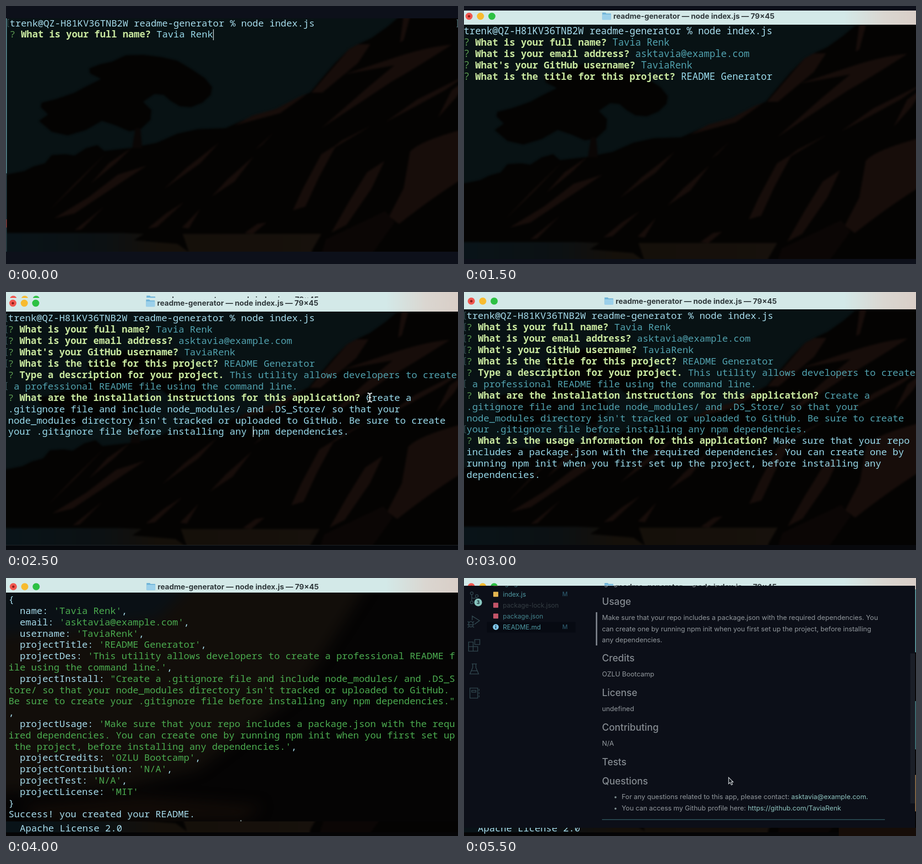
These frames come from a looping animation (989 px wide and 566 px high, 6000 ms). An HTML page:

```html
<!DOCTYPE html>
<html lang="en">
<head>
<meta charset="utf-8">
<title>readme-generator</title>
<style>
html, body { margin: 0; width: 100%; height: 100%; overflow: hidden; background: #0d101a; }
svg { display: block; width: 989px; height: 566px; }
text { white-space: pre; font-family: Inter, sans-serif; }
.mono { font-family: "Noto Sans Mono", "DejaVu Sans Mono", monospace; font-weight: 500; }
.badge { font-family: "DejaVu Sans", sans-serif; }
.scene { display: none; }
.line { fill: none; stroke-width: 1.6; }
</style>
</head>
<body>
<svg id="stage" viewBox="0 0 989 566">
  <defs>
    <linearGradient id="pale">
      <stop offset=".84" stop-color="#d3e9e8"/><stop offset=".93" stop-color="#dad6d0"/><stop offset="1" stop-color="#d9cec7"/>
    </linearGradient>
    <linearGradient id="water">
      <stop offset="0" stop-color="#091419"/><stop offset=".33" stop-color="#0c1113"/><stop offset=".5" stop-color="#15100a"/><stop offset="1" stop-color="#17110c"/>
    </linearGradient>
    <filter id="soft" color-interpolation-filters="sRGB"><feGaussianBlur stdDeviation="2"/></filter>
    <filter id="haze" color-interpolation-filters="sRGB"><feGaussianBlur stdDeviation="14"/></filter>
    <clipPath id="view"><rect y="17" width="989" height="531"/></clipPath>
    <clipPath id="page"><rect x="250" y="84" width="730" height="640"/></clipPath>
    <clipPath id="high"><rect width="989" height="13"/></clipPath>
    <clipPath id="pane"><rect y="32" width="989" height="502"/></clipPath>
    <g id="land">
      <rect x="-20" y="-20" width="1030" height="620" fill="#081214"/>
      <g filter="url(#soft)">
        <path fill="#040302" d="M-20 374L40 362 60 352 85 345 100 327 130 325 150 328 175 312 200 305 215 318 275 311 330 300 375 280 420 270 480 268 520 250 560 238 600 222 640 200 665 190 690 160 720 125 750 95 770 84 800 70 835 45 870 15V-20H1010V600H-20Z"/>
        <path fill="#040302" d="M72 252L92 238 76 222 78 212 110 204 150 190 172 178 208 160 184 148 182 137 205 128 232 122 262 108 300 107 340 112 375 120 405 138 435 158 451 178 448 195 430 212 405 222 380 220 360 208 345 195 325 193 300 210 318 228 316 250 295 270 270 275 240 262 210 252 175 272 135 284 100 276Z"/>
        <path fill="#0a0605" d="M283 268H294L298 312H276Z"/>
        <g fill="#170d0a">
          <path d="M884 320Q905 295 1010 268V372Q940 415 860 478L838 462 870 400Z"/>
          <path d="M750 95L770 84 797 84 770 125 740 150 692 190 668 190Z"/>
          <path d="M640 200L660 192 600 235 500 262 540 240 590 226Z"/>
          <path d="M860 110Q930 88 975 85Q890 140 845 165L690 268 790 180 850 130 740 150Z"/>
          <path d="M1010 150L960 185 900 218 830 255 900 205Z"/>
          <path d="M1010 160L975 185 945 245 985 200Z"/>
          <path d="M870 20L885 20 870 75 862 80Z"/>
          <path d="M690 325L718 308 735 295 800 262 720 310 685 375 655 440 628 448 650 400Z"/>
          <path d="M828 340L800 400 745 480 712 497 750 430 790 365Z"/>
          <path d="M220 322L160 385 95 448 150 390ZM275 311L240 345 185 390 225 345ZM308 350L240 395 150 455 105 466 180 420 245 370Z"/>
          <path d="M466 300L425 345 345 402 395 355ZM542 330L500 385 450 418 485 380ZM425 445L400 488 385 486ZM570 475L540 500 522 498 550 478ZM585 278L560 305 545 315ZM390 430L330 485 310 488 350 455ZM215 440L165 490 150 492Z"/>
        </g>
        <path fill="url(#water)" d="M-20 498H250L300 500H690L670 535 660 600H-20Z"/>
        <path fill="#040302" d="M280 514L320 488 380 482 392 515 400 540 375 522Z"/>
        <path fill="#0b0605" d="M700 512L830 450 850 475 800 545 690 545Z"/>
      </g>
    </g>
  </defs>
</svg>
<script>
const STEP = 500;
const USER = "Tavia Renk", MAIL = "asktavia@example.com", NICK = "TaviaRenk", TEAM = "OZLU Bootcamp";
const PROMPT = "trenk@QZ-H81KV36TNB2W readme-generator % node index.js";
const C = { cmd: "#a6dbeb", live: "#98d9ea", done: "#51a2af", mark: "#5a9750", ask: "#c8e79f", str: "#4bab4f", dim: "#3f5b62" };

const rect = (x, y, w, h, fill, more = "") => `<rect x="${x}" y="${y}" width="${w}" height="${h}" fill="${fill}" ${more}/>`;
const dot = (x, y, r, fill) => `<circle cx="${x}" cy="${y}" r="${r}" fill="${fill}"/>`;
const line = (d, stroke, more = "") => `<path class="line" d="${d}" stroke="${stroke}" ${more}/>`;
const group = (s, attr) => `<g ${attr}>${s}</g>`;
const span = (s, fill, bold) => `<tspan fill="${fill}"${bold ? ' font-weight="700"' : ""}>${s}</tspan>`;
// y is the middle of the capitals
const text = (x, y, size, s, fill, more = "") =>
  `<text x="${x}" y="${(y + size * .36).toFixed(2)}" font-size="${size}" fill="${fill}" ${more}>${s}</text>`;

// ---- terminal ----
const asks = [
  ["What is your full name?", USER],
  ["What is your email address?", MAIL],
  ["What's your GitHub username?", NICK],
  ["What is the title for this project?", "README Generator"],
  ["Type a description for your project.", "This utility allows developers to create\n a professional README file using the command line."],
  ["What are the installation instructions for this application?", "Create a\n.gitignore file and include node_modules/ and .DS_Store/ so that your\nnode_modules directory isn't tracked or uploaded to GitHub. Be sure to create\nyour .gitignore file before installing any npm dependencies."],
  ["What is the usage information for this application?", "Make sure that your repo\nincludes a package.json with the required dependencies. You can create one by\nrunning npm init when you first set up the project, before installing any\ndependencies."],
  ["Who needs to be credited?", TEAM],
  ["What are the contribution guidelines for this project?", "N/A"],
  ["What are the test instructions for this project?", "N/A"],
];

// rows: { s: markup, end: bracket at the left edge }
function session(count) {
  const rows = [{ s: span(PROMPT, C.cmd), end: true }];
  asks.slice(0, count).forEach(([ask, answer], i) => {
    const live = i === count - 1, parts = answer.split("\n");
    parts.forEach((p, k) => rows.push({
      s: (k ? "" : span("? ", C.mark) + span(ask + " ", C.ask, true)) + span(p, live ? C.live : C.done),
      end: !live && k === parts.length - 1
    }));
  });
  return rows;
}

function terminal(x, y, pitch, cell, rows) {
  return rows.map((r, i) => {
    const cy = y + i * pitch;
    return text(x, cy, +(cell / .6).toFixed(2), r.s, C.cmd, 'class="mono"') +
      (r.end ? line(`M${x - 1} ${cy - 8}h-3v16h3`, "#4b6a70", 'style="stroke-width:1"') : "");
  }).join("");
}

function titleBar(top, bottom, y, x) {
  const lights = ["#f0574f", "#f7bb2f", "#2dc143"].map((c, i) => dot(x + i * 25, y, 7.8, c)).join("");
  const fx = x + 291.5;
  return rect(0, top, 989, bottom - top, "url(#pale)") + lights + dot(x, y, 2.6, "#8a1d18") +
    `<path fill="#6fb4d8" d="M${fx} ${y - 8}h7l2 2h10v13h-19z"/>` + rect(fx, y - 4, 19, 12, "#9bd0ea", 'rx="1.5"') +
    text(x + 492, y, 16.3, "readme-generator — node index.js — 79×45", "#30393c", 'font-weight="700" text-anchor="middle"');
}

const land = (x, y) => `<use href="#land" x="${x}" y="${y}"/>`;
const edge = (y, c = "#0d101a") => rect(0, y, 989, 566 - y, c);

const opening = () => land(0, 0) + rect(0, 0, 989, 27, "#0d101a") + edge(539) +
  rect(0, 27, 2, 340, "#54828a") + rect(0, 367, 2, 172, "#24393f") + rect(0, 468, 2, 18, "#7c3b3a") +
  terminal(8, 37.3, 24.6, 12.36, session(1)) + line("M986 30h2v16h-2", "#4b6a70") + rect(453, 51, 1.5, 24, "#c8d4d6");

const early = n => land(-5, 20) + rect(0, 0, 989, 10, "#0d101a") + edge(555) +
  titleBar(10, 41, 22.5, 11) + terminal(-.5, 54.5, 25.1, 12.51, session(n));

const middle = (n, y, bottom) => land(-4, y - 3) + edge(bottom, "#08090d") + titleBar(0, y + 18, y, 16) +
  terminal(5.5, y + 32, 24.9, 12.43, session(n));

const BEAM = "M791 222q5 0 5 4v11q0 4-5 4M801 222q-5 0-5 4v11q0 4 5 4M793 231.500h6";
const beam = line(BEAM, "#14181a", 'style="stroke-width:5"') + line(BEAM, "#e8eeee", 'style="stroke-width:2"');

const install = () => land(-4, 20) + edge(555, "#06080c") + rect(0, 555, 989, 1, "#22282c") +
  titleBar(13, 43, 24.5, 15) + group(titleBar(0, 30, 16, 16), 'clip-path="url(#high)"') +
  terminal(4.5, 57, 24.9, 12.44, session(6)) + rect(540, 294, 1.5, 24, "#c8d4d6") + beam;

const license = () => {
  const rows = session(11);
  rows.push(
    { s: span("? ", C.mark) + span("What license was used for this project? ", C.ask, true) + span("(Use arrow keys)", C.dim) },
    { s: span("❯ MIT", "#55aebd") }, { s: "  Apache License 2.0" });
  return land(-4, 16) + edge(558, "#050506") + titleBar(0, 37, 19, 16) + terminal(5.5, 51, 24.9, 12.43, rows);
};

// "|" switches between plain and string colour
const dump = `{
  name: |'${USER}'|,
  email: |'${MAIL}'|,
  username: |'${NICK}'|,
  projectTitle: |'README Generator'|,
  projectDes: |'This utility allows developers to create a professional README f
|ile using the command line.'|,
  projectInstall: |"Create a .gitignore file and include node_modules/ and .DS_S
|tore/ so that your node_modules directory isn't tracked or uploaded to GitHub. 
|Be sure to create your .gitignore file before installing any npm dependencies."
,
  projectUsage: |'Make sure that your repo includes a package.json with the requ
|ired dependencies. You can create one by running npm init when you first set up
| the project, before installing any dependencies.'|,
  projectCredits: |'${TEAM}'|,
  projectContribution: |'N/A'|,
  projectTest: |'N/A'|,
  projectLicense: |'MIT'
}
Success! you created your README.`;

const smoke = group(rect(0, 32, 989, 502, "#050404") + group(
  `<path fill="#120e0a" d="M-60 0H800L640 250 420 420 250 460 -60 470Z"/>` +
  `<path fill="#0a1015" d="M-60 0H420L330 90 160 110 -60 130Z"/>` +
  `<path fill="#110b07" d="M40 500L300 480 560 500 520 530 60 530Z"/>`, 'filter="url(#haze)"'), 'clip-path="url(#pane)"');

const result = () => license() + smoke +
  terminal(5.5, 46.8, 24.8, 12.37, dump.split("\n").map(l => ({
    s: l.split("|").map((p, i) => span(p, i % 2 ? C.str : C.cmd)).join("")
  }))) + rect(513, 531, 2, 3, "#8a9a9c");

// ---- editor ----
const BG = "#0c0f18", GREY = "#92989d", HEAD = "#848a90", LINK = "#8fc4bf", TEAL = "#4f9aa4", ICON = "#30464e";

const info = (x, y) => dot(x, y, 6.5, "#7fc6ea") + rect(x - .8, y - 1, 1.6, 4.5, BG) + dot(x, y - 3, 1, BG);
const square = (x, y, c) => rect(x - 5.5, y - 5.5, 11, 11, c, 'rx="1"');
const JS = "#e3b550", NPM = "#c25468";

function activity() {
  const s = [
    "M21 118m11 0a7.500 7.500 0 1 0-15 0 7.500 7.500 0 1 0 15 0M19 124l-6 8",
    "M19 166v14M19 171q0 5 11 2M19 163m3 0a3 3 0 1 0-6 0 3 3 0 1 0 6 0M22 183a3 3 0 1 0-6 0 3 3 0 1 0 6 0M33 169a3 3 0 1 0-6 0 3 3 0 1 0 6 0",
    "M20 222v-9l16 10-11 8M22 231a5 6 0 1 0-10 0 5 6 0 1 0 10 0M10 225l3 2M24 225l-3 2M9 232h15M10 238l3-2M24 238l-3-2",
    "M12 270h10v10h10v10H12zM12 280h10v10M25.500 264.500h11v11h-11z",
    "M19 318h11M21 318v8l-6 14h19l-6-14v-8M18 333h13",
    "M15 371h17v22H15zM19 376h9v4h-9zM35 373v4M35 380v4M35 387v4"
  ];
  return line("M19 56h10l6 6v13H19zM19 62h-6v19h15v-6", "#7c969c") + s.map(d => line(d, ICON)).join("") +
    dot(33, 183, 8.5, "#86c4be") + text(33, 183, 10, "3", "#10202a", 'font-weight="700" text-anchor="middle"');
}

function explorer() {
  const y = i => 117.5 + i * 23.9;
  const names = ["node_modules", ".gitignore", "index.js", "package-lock.json", "package.json", "README.md"];
  const fills = ["#364247", "#3f7a82", TEAL, "#343d43", "#43828b", TEAL];
  return text(72, 63, 12.2, "EXPLORER", "#858d92") + text(213, 61, 14, "···", "#6d757a") +
    line("M57 91.500l4 4 4-4", "#4b7f88") + text(72, 94, 12, "README-GENERATOR", "#356a75", 'font-weight="700"') +
    rect(52, 226, 194, 23, "#070a12") +
    names.map((n, i) => text(87, y(i), 14, n, fills[i])).join("") +
    `<path fill="#38635d" d="M65 112h5l2 2h6v9H65z"/>` + dot(75, 120, 3.2, "#54b98a") +
    square(71.5, y(1), "#c0525a") + square(71.5, y(2), JS) + square(71.5, y(3), NPM) + square(71.5, y(4), NPM) + info(71.5, y(5)) +
    [2, 5].map(i => text(217, y(i), 13, "M", "#2b5668", 'font-weight="500"')).join("");
}

function tabs() {
  return ["#ee5a50", "#f0b632", "#2fba45"].map((c, i) => dot(13.5 + i * 18.3, 29, 5.6, c)).join("") +
    text(493.5, 28, 13, "Preview README.md — readme-generator", "#949b9f", 'text-anchor="middle"') +
    line("M888 22h13v13h-13zM912 22h13v13h-13zM912 31h13M936 22h13v13h-13zM945 22v13M960 22h5v5h-5zM960 30h5v5h-5zM968 22h5v5h-5zM968 30h5v5h-5z", "#858d92", 'style="stroke-width:1.2"') +
    rect(888, 22, 5, 13, "#858d92") +
    square(255.5, 63, JS) + text(270, 63, 14, "index.js", TEAL) + text(326, 63, 13, "M", "#2b5668", 'font-weight="500"') +
    info(388.5, 63) + text(403, 63, 14, "README.md", TEAL) + text(491, 63, 13, "M", "#2b5668", 'font-weight="500"') +
    square(554, 63, NPM) + text(568.5, 63, 14, "package.json", "#43828b") +
    line("M700 57h14v12h-14zM700 60.500h14M703 64h3v3h-3zM709 64h4M709 67h4", "#a4adb0", 'style="stroke-width:1.3"') +
    text(721, 63, 13.8, "Preview README.md", "#d3dddd", 'font-weight="500"') +
    line("M871 58l9 9M880 58l-9 9", "#c2cccc") + rect(687, 79.5, 203, 1.8, "#5ea5a5") +
    line("M905 57v-1h6l4 4v10h-10v-4M911 56v4h4M901 62h7M905 59l-4 3 4 3M930 56h13v13h-13zM936.500 56v13", "#929a9e", 'style="stroke-width:1.4"') +
    [959, 964.5, 970].map(x => dot(x, 63, 1.3, "#929a9e")).join("");
}

function doc() {
  const h = (y, s) => text(304, y, 20.8, s, HEAD, 'font-weight="500"');
  const p = (y, ...rows) => rows.map((s, i) => text(304, y + i * 24.4, 14.7, s, GREY)).join("");
  const li = (y, s, weight = 500) => dot(333.5, y + 1, 2.2, "#7b8a8c") + text(347, y, 14.7, s, LINK, `font-weight="${weight}"`);
  const toc = ["Installation", "Usage", "Credits", "License", "Contributing", "Questions"];
  return text(304, 116, 28, "README Generator", HEAD) + rect(304, 142, 619, 1.3, "#2a303a") +
    h(183, "Badge") + rect(303, 205, 57, 22, "#4b5546", 'rx="2"') + rect(359, 205, 33.5, 22, "#0b73b4", 'rx="2"') +
    text(309, 216, 12, "License", "#d9e0da", 'class="badge"') + text(364, 216, 12.3, "MIT", "#d8e8f2", 'class="badge"') +
    h(263, "Description") + p(297, "This utility allows developers to create a professional README file using the command", "line.") +
    h(364, "Table of Contents") + toc.map((s, i) => li(398 + i * 24.3, s)).join("") +
    h(561, "Installation") + p(596, "Create a .gitignore file and include node_modules/ and .DS_Store/ so that your", "node_modules directory isn't tracked or uploaded to GitHub. Be sure to create your", ".gitignore file before installing any npm dependencies.") +
    h(685, "Usage") + p(720, "Make sure that your repo includes a package.json with the required dependencies. You", "can create one by running npm init when you first set up the project, before installing", "any dependencies.") +
    h(809, "Credits") + p(844, TEAM) + h(885, "License") + p(920, "undefined") +
    h(961, "Contributing") + p(996, "N/A") + h(1037, "Tests") + h(1079, "Questions") +
    li(1113, span("For any questions related to this app, please contact: ", GREY) + MAIL + ".", 400) +
    li(1138, span("You can access my Github profile here: ", GREY) + "https://github.com/" + NICK, 400) +
    rect(304, 1162, 619, 2, "#284850");
}

const arrow = (x, y) => `<path transform="translate(${x} ${y})" d="M0 0V14L3.300 11 6 16.500 8.500 15.300 6 10H10Z" fill="#11151c" stroke="#d5dadd" stroke-width="1.3"/>`;

function editor(dx, dy, scroll, pointer, extra = "") {
  const win = rect(0, 10, 989, 720, BG) + tabs() + activity() + explorer() +
    group(group(doc(), `transform="translate(0 ${-scroll})"`), 'clip-path="url(#page)"') +
    rect(978.5, 82 + scroll * .423, 10.5, 329, "#1a1e27");
  return result() + rect(820, 548, 169, 18, "#160d08") +
    group(group(win, `transform="translate(${dx} ${dy})"`) + extra + pointer, 'clip-path="url(#view)"');
}

const rim = rect(987, 25, 2, 138, "#5c9a9e") + rect(987, 270, 2, 106, "#3f7378") + rect(987, 432, 2, 80, "#8a6a45");

const scenes = [
  opening(), early(2), early(3), early(4),
  middle(5, 17, 556), install(), middle(7, 20, 555), license(), result(),
  editor(0, 0, 0, arrow(593, 312)),
  editor(-2, -129.5, 250, arrow(586, 420), rim),
  editor(-2, -129.5, 503.5, arrow(579, 437.5), rect(288.5, 75, 3, 73, "#868b94") + rim)
];

const stage = document.getElementById("stage");
stage.insertAdjacentHTML("beforeend", scenes.map(s => group(s, 'class="scene"')).join(""));
const nodes = [...stage.querySelectorAll(".scene")];
let shown = -1;

function draw() {
  const now = Math.floor(performance.now() / STEP) % nodes.length;
  if (now !== shown) {
    if (shown >= 0) nodes[shown].style.display = "none";
    nodes[now].style.display = "inline";
    shown = now;
  }
  requestAnimationFrame(draw);
}
draw();
</script>
</body>
</html>
```
